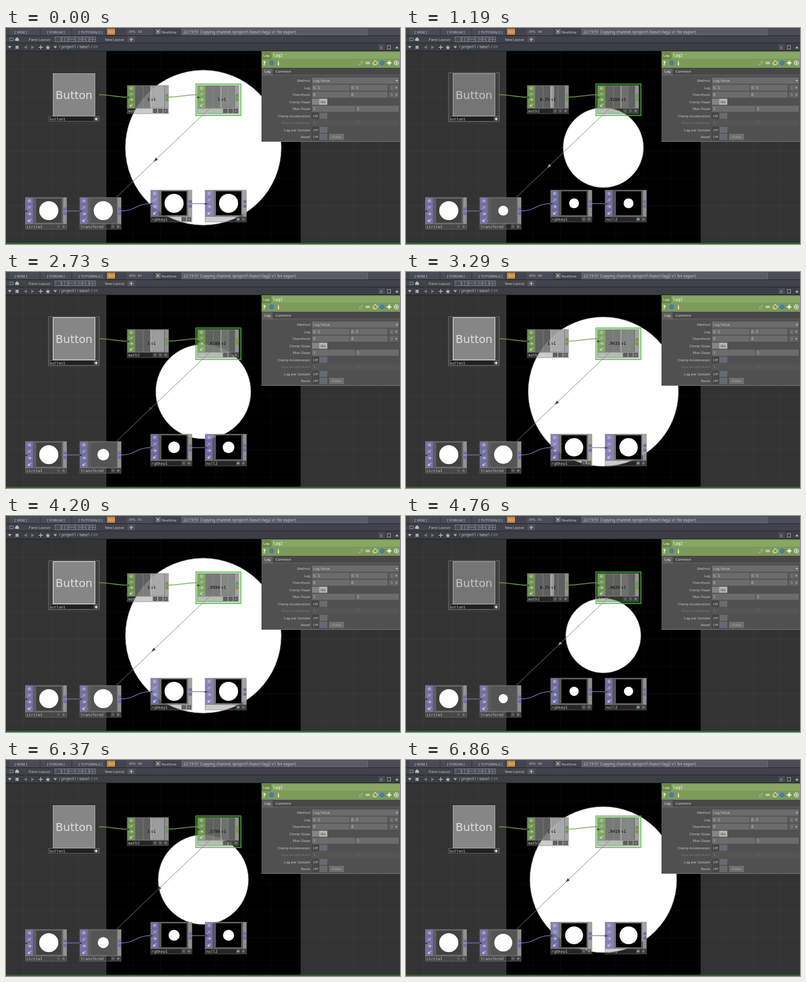
These frames come from a looping animation (640 px wide and 353 px high, 6930 ms). An HTML page:

```html
<!DOCTYPE html>
<html lang="en">
<head>
<meta charset="utf-8">
<title>Lag node network</title>
<style>
  html, body { margin: 0; width: 100%; height: 100%; overflow: hidden; background: #333; }
  svg { display: block; width: 640px; height: 353px; }
  text { font: 5.8px "Noto Sans", "DejaVu Sans", sans-serif; fill: #c8c8c8; white-space: pre; }
  .mono { font: 6.4px "DejaVu Sans Mono", monospace; }
  .ink { font-size: 6.6px; fill: #050505; }
  .help { font: bold 9px "DejaVu Sans", sans-serif; fill: #fff; }
  #buttonText { font: 17.9px "DejaVu Sans", sans-serif; }
  .wire { fill: none; stroke-width: 1.4; stroke-opacity: .85; }
</style>
</head>
<body>
<svg id="stage" viewBox="0 0 640 353" xmlns="http://www.w3.org/2000/svg"></svg>
<script>
const LOOP = 6930;
const FULL_RADIUS = 126.7, THUMB_RADIUS = 15.5;
const LOW = 0.25, HIGH = 1;
const LAG_RATE = Math.LN10 / 0.5;   // 90% of the way in half a second
const FPS = [53, 34, 41, 40, 41, 42, 39];
const PRESSES = [707, 2371, 4243, 6042];

const attrs = o => Object.entries(o).map(([k, v]) => ` ${k}="${v}"`).join('');
const rect = (x, y, w, h, fill, more = {}) =>
  `<rect${attrs({ x, y, width: w, height: h, fill, ...more })}/>`;
const disc = (cx, cy, r, fill, more = {}) => `<circle${attrs({ cx, cy, r, fill, ...more })}/>`;
const path = (d, stroke, more = {}) => `<path${attrs({ d, stroke, fill: 'none', ...more })}/>`;
const text = (x, y, s, more = {}) => `<text${attrs({ x, y, ...more })}>${s}</text>`;
const mono = (x, y, s, more = {}) => text(x, y, s, { class: 'mono', ...more });
const size = px => `font-size:${px}px`;

function grid() {
  let d = '';
  for (let x = 28.5; x < 640; x += 44.6) d += `M${x.toFixed(1)} 38V350`;
  for (let y = 67.5; y < 350; y += 44.6) d += `M0 ${y.toFixed(1)}H640`;
  return path(d, '#fff', { 'stroke-opacity': .035 });
}

function topBars() {
  const button = (x, w, s, tx) => rect(x, 1, w, 11, '#4a4d55') + text(tx, 8.6, s, { style: size(6) });
  let s = rect(0, 0, 640, 38, '#3b3e45')
    + rect(0, 0, 640, 12, '#41444c') + rect(0, 12, 640, 1, '#25272c')
    + rect(0, 13, 640, 11, '#40434a') + rect(0, 24, 640, 1, '#25272c')
    + rect(0, 37, 640, 1, '#202226')
    + button(6, 48, '[ WIKI ]', 14) + button(57, 48, '[ FORUM ]', 67)
    + button(108, 52, '[ TUTORIALS ]', 118)
    + rect(164, 1, 13, 10, '#c7843c') + text(166.5, 8.3, 'O|I', { style: 'fill:#fff' })
    + rect(195, 1, 44, 11, '#4a4d55')
    + text(200, 8.4, '', { id: 'fps' })
    + rect(243.5, 2.5, 7, 7, '#555', { stroke: '#999', 'stroke-width': .6 })
    + path('M245 4l4 4m0-4l-4 4', '#ddd', { 'stroke-width': 1 })
    + text(253, 8.5, 'Realtime')
    + rect(285.5, 1.5, 302, 10, '#5a5c64', { stroke: '#757780', 'stroke-width': .7 })
    + rect(588, 1, 52, 11, '#4a4d55')
    + text(288, 8.9, '22:19:51 Copying channel /project1/base1/lag2 v1 for export.', { style: size(6.45) })
    + path('M6 16.5h6v4h-6z', '#999', { 'stroke-width': .8 })
    + rect(15, 18, 6, 3, '#bbb') + path('M15 18l3-3 3 3z', 'none', { fill: '#bbb' })
    + text(37, 21, 'Pane Layout', { style: size(6) }) + text(160.5, 21, 'New Layout', { style: size(5.7) })
    + rect(197.5, 14, 12, 9.5, '#50535b') + path('M200.5 18.8h6m-3-3v6', '#ccc', { 'stroke-width': 1 });
  for (let i = 0; i < 6; i++) {
    const x = 79.5 + i * 11.2;
    s += rect(x, 14.5, 10, 8, '#4b4e56', { stroke: '#8b8d92', 'stroke-width': .7 });
    if (i) s += path(i === 2 ? `M${x} 18.5h10` : `M${x + 5} 14.5v8`, '#8b8d92', { 'stroke-width': .7 });
    if (i > 2) s += path(`M${x + (i === 3 ? 5 : 0)} 18.5h${i === 5 ? 10 : 5}`, '#8b8d92', { 'stroke-width': .7 });
  }
  return s + path('M3 29.5h6l-3 4z', 'none', { fill: '#bbb' }) + rect(15.5, 29, 5, 5, '#aaa')
    + path('M34 28.5l-5 3 5 3z', 'none', { fill: '#777' }) + path('M41 28.5l5 3-5 3z', 'none', { fill: '#777' })
    + path('M53 31.5h7m-3.5-3.5v7', '#ccc', { 'stroke-width': 1 })
    + path('M68 27.5l1 3h3l-2.4 2 1 3-2.6-1.8-2.6 1.8 1-3-2.4-2h3z', 'none', { fill: '#bbb' })
    + path('M77 29.5h6l-3 4z', 'none', { fill: '#aaa' })
    + text(86, 33.4, '/ project1 / base1 / &gt;&gt;', { style: size(6.2) })
    + rect(605, 26.5, 10, 9.5, '#4a4d55') + text(607.8, 33.5, '0')
    + rect(619.5, 28.5, 5, 6, 'none', { stroke: '#aaa', 'stroke-width': .8 })
    + path('M632 33.5h6l-3-4z', 'none', { fill: '#aaa' });
}

function panel() {
  const field = (x, y, w, s) => rect(x, y - 5, w, 10, '#6b6b6b')
    + mono(x + 2, y + 2.2, s, { style: size(6.2) });
  const toggle = (y, on) => rect(497, y - 5, 13, 10, on ? '#858585' : '#444')
    + rect(509, y - 5, 13, 10, on ? '#b5b5b5' : '#666a72')
    + text(on ? 511 : 498.5, y + 2, on ? 'On' : 'Off', { style: on ? 'fill:#222' : '' });
  const label = (y, s, dim) => text(494, y + 2, s, { 'text-anchor': 'end', style: dim ? 'fill:#777' : '' });
  const pair = (y, s) => field(497, y, 61, s) + field(559, y, 61, s);
  const scope = y => rect(622, y - 5, 16, 10, '#626262') + text(625, y + 2, 'S', { style: 'fill:#aaa' })
    + path(`M633 ${y - 2}l3 2-3 2z`, 'none', { fill: '#aaa' });
  return rect(415, 38, 225, 148, '#505050') + rect(415, 38, 225, 27, '#7c9a59')
    + rect(415, 39, 16, 12, '#6a8649') + rect(432, 40, 208, 10, '#8aa667')
    + text(418, 47.4, 'Lag', { style: 'fill:#fff' }) + mono(434, 47.4, 'lag2', { style: 'fill:#fff' })
    + text(417, 60.5, '?', { class: 'help' }) + disc(431.5, 57, 4, '#4a7ba8')
    + text(441, 60.5, 'i', { class: 'help' })
    + path('M573 60l5-6 2 1.5-5 5z', '#b4c59e', { 'stroke-width': .8 })
    + '<ellipse cx="587.5" cy="57" rx="4" ry="2.3" fill="#b4c59e"/>'
    + path('M596 57l4-4 4 4-3 3h-4z', '#fff')
    + disc(611, 57, 4, '#4a7ba8')
    + path('M619 57h7m-3.5-3.5v7', '#fff', { 'stroke-width': 2 })
    + disc(634, 57, 3.4, 'none', { stroke: '#fff' }) + disc(634, 57, 1.3, '#fff')
    + rect(415, 65, 225, 12, '#484848') + rect(416, 66, 17, 12, '#606060')
    + rect(433, 76.5, 207, .7, '#6c6c6c')
    + text(420, 73.3, 'Lag', { style: 'fill:#eee' }) + text(438, 73.3, 'Common', { style: 'fill:#ddd' })
    + label(86, 'Method') + rect(497, 81, 141, 10, '#6b6b6b') + text(499, 88.1, 'Lag Value', { style: size(6) })
    + path('M633 85h4l-2 3z', 'none', { fill: '#bbb' })
    + label(97.5, 'Lag') + pair(97.5, '0.5') + scope(97.5)
    + label(109, 'Overshoot') + pair(109, '0') + scope(109)
    + label(120.5, 'Clamp Slope') + toggle(120.5, true)
    + label(132, 'Max Slope') + field(497, 132, 70, '1') + field(568, 132, 70, '1')
    + label(143.5, 'Clamp Acceleration') + toggle(143.5)
    + label(155, 'Max Acceleration', true)
    + rect(497, 150, 141, 10, '#545454')
    + mono(499, 157, '1', { style: 'fill:#777' }) + mono(570, 157, '1', { style: 'fill:#777' })
    + label(166.5, 'Lag per Sample') + toggle(166.5)
    + label(178, 'Reset') + toggle(178)
    + rect(525, 173, 24, 10, '#707070') + text(530, 180, 'Pulse', { style: 'fill:#aaa' })
    + rect(415, 185, 225, 1, '#777');
}

function stripIcons(x, y, step) {
  const ink = '#d0d0d0';
  let s = '';
  for (let i = 0; i < 4; i++) {
    const cy = y + step * (i + .5), cx = x + 6.5;
    s += rect(x + 1, y + step * i + .5, 11, step - 1, '#fff', { opacity: .1 });
    s += i === 0 ? disc(cx, cy, 2.6, ink, { opacity: .6 })
      : i === 1 ? path(`M${cx - 3} ${cy + 2}l6-4m-4 0l2 4`, ink, { 'stroke-width': .9 })
      : i === 2 ? path(`M${cx - 3} ${cy}h4m-1-2l3 2-3 2z`, ink, { fill: ink, 'stroke-width': .8 })
      : disc(cx - .7, cy + .6, 2, ink) + disc(cx + 2, cy - 1.8, 1, ink);
  }
  return `<g opacity=".85">${s}</g>`;
}

function nodeFrame(x, y, h, name, tint, viewer, flags) {
  const base = y + h;
  let s = rect(x, base, 67, 9, '#6a6a6a', { 'fill-opacity': .35, stroke: '#777', 'stroke-width': .6 })
    + mono(x + 1.5, base + 7, name, { style: size(6.2) })
    + rect(x, y, 13, h, tint, { opacity: .9 })
    + rect(x + 13, y, 48, h, viewer, { 'fill-opacity': .88 })
    + rect(x + 61, y, 6, h, '#9c9c9c', { opacity: .92 })
    + rect(x + 62, y + h * .38, 5, 5, tint) + rect(x + 62, y + h * .55, 5, 5, tint)
    + rect(x - 1, y + h * .5, 4, 2, '#1c1c1c')
    + rect(x, y, 67, h, 'none', { stroke: '#888', 'stroke-opacity': .8, 'stroke-width': .8 })
    + stripIcons(x, y, h / 4);
  for (let i = 0; i <= flags; i++) {
    s += rect(x + 58.5 - 8.5 * i, base + 1, 7.5, 7, '#4a4a4d', { opacity: .85 });
    if (i) s += disc(x + 62.2 - 8.5 * i, base + 4.6, 2, name === 'null2' ? '#7d9be0' : '#626268');
  }
  return s + path(`M${x + 60} ${base + 4.6}h4.5m-2.25-2.25v4.5`, '#999', { 'stroke-width': .8 });
}

function channelNode(id, x, name) {
  const zero = x + 38;
  return nodeFrame(x, 94, 37, name, '#6f9a4c', '#6c6c6c', 2)
    + rect(zero, 94.5, 0, 36, '#d8d8d8', { id: id + 'Bar', opacity: id === 'lag' ? .12 : .5 })
    + path(`M${zero - 12} 94.5v36m24-36v36`, '#aaa', { 'stroke-width': .6, opacity: .6 })
    + rect(zero - .4, 94.5, .9, 36, '#ddd', { opacity: .85 })
    + mono(zero - 1.5, 119, '', { id: id + 'Value', class: 'mono ink', 'text-anchor': 'end' })
    + mono(zero + .5, 119, 'v1', { class: 'mono ink' });
}

function imageNode(x, y, name, fill, moving) {
  return nodeFrame(x, y, 43, name, '#716ca8', '#666', 1)
    + rect(x + 17.5, y + 2, 41, 39, fill)
    + disc(x + 38, y + 21.5, THUMB_RADIUS, '#fff', moving ? { class: 'thumb' } : {});
}

function buttonNode() {
  return rect(69, 73, 82.5, 80, '#3f3f3f', { id: 'buttonFrame', stroke: '#777', 'stroke-width': .8 })
    + rect(76.5, 74.5, 68, 69, '#757575', { id: 'buttonFace', stroke: '#aaa' })
    + text(110.5, 115.8, 'Button', { id: 'buttonText', 'text-anchor': 'middle' })
    + rect(69.5, 144.5, 82, 8, '#202020', { stroke: '#777', 'stroke-width': .7 })
    + mono(71, 150.8, 'button1', { style: size(6) })
    + rect(142, 145, 9, 7.5, '#444') + path('M144 148.7h5m-2.5-2.5v5', '#fff', { 'stroke-width': 1.2 });
}

const wire = (d, color) => path(d, color, { class: 'wire' });
const GREEN = '#75a653', VIOLET = '#7b76b4';

document.getElementById('stage').innerHTML =
  `<defs><pattern id="checker" width="2" height="2" patternUnits="userSpaceOnUse">
    <rect width="2" height="2" fill="#4b4b4b"/><path d="M0 0h1v1h-1zM1 1h1v1h-1z" fill="#5d5d5d"/></pattern></defs>`
  + rect(0, 0, 640, 353, '#333') + rect(163, 38, 315.5, 313, '#000')
  + disc(320.5, 195.5, 1, '#fff', { id: 'ball', stroke: '#777', 'stroke-width': .7 })
  + grid()
  + wire('M151 109C170 109 178 113 197 113', GREEN)
  + wire('M264 113C282 113 292 109 311 109', GREEN)
  + wire('M98 299H120', VIOLET)
  + wire('M186 299C212 299 210 287 235 287', VIOLET)
  + wire('M301 287H323', VIOLET)
  + buttonNode()
  + rect(308.5, 91.5, 73, 51.5, '#3c8c2c', { 'fill-opacity': .2, stroke: '#4cbc40', 'stroke-width': 1.8, 'stroke-opacity': .8 })
  + channelNode('math', 197, 'math2')
  + channelNode('lag', 311, 'lag2')
  + path('M330 132L180 276', '#808080', { 'stroke-width': .9 })
  + path('M-4 3.8L-.8-2.8 2.8.8z', 'none', { id: 'arrow' })
  + imageNode(31.5, 277, 'circle1', '#414141')
  + imageNode(120, 277, 'transform3', 'url(#checker)', true)
  + imageNode(235, 265, 'rgbkey1', '#000', true)
  + imageNode(323.5, 265, 'null2', '#000', true)
  + panel() + topBars()
  + rect(0, 351, 640, 1.5, '#237a2b');

const el = id => document.getElementById(id);
const set = (node, o) => { for (const k in o) node.setAttribute(k, o[k]); };
const thumbs = document.querySelectorAll('.thumb');

// Gap left after a step: slope limited to 1 per second, then exponential.
function remainingGap(seconds) {
  const knee = 1 / LAG_RATE, linear = HIGH - LOW - knee;
  return seconds < linear ? HIGH - LOW - seconds : knee * Math.exp(-LAG_RATE * (seconds - linear));
}

function laggedValue(t, pressCount, target) {
  if (!pressCount) return HIGH;
  const gap = remainingGap((t - PRESSES[pressCount - 1]) / 1000);
  return target === HIGH ? HIGH - gap : LOW + gap;
}

function showChannel(id, value, label) {
  el(id + 'Value').textContent = label;
  el(id + 'Bar').setAttribute('width', 22 * value);
}

function arrowX(t) {
  const start = 233, span = 36;
  const x = 251.5 - .0455 * t - 7.5 * Math.max(0, 1 - t / 1190);
  return start + (((x - start) % span) + span) % span;
}

function draw(t) {
  const pressCount = PRESSES.filter(p => p <= t).length;
  const on = pressCount % 2 === 0;
  const hovered = pressCount > 0 && pressCount < 4;
  const target = on ? HIGH : LOW;
  const value = laggedValue(t, pressCount, target);

  el('fps').textContent = 'FPS:  ' + FPS[Math.floor(t / 1000)];
  set(el('ball'), { r: FULL_RADIUS * value });
  thumbs.forEach(n => set(n, { r: THUMB_RADIUS * value }));
  showChannel('math', target, on ? '1' : '0.25');
  showChannel('lag', value, value > .99995 ? '1' : value.toFixed(4).slice(1));

  const x = arrowX(t);
  set(el('arrow'), { transform: `translate(${x} ${132 + (330 - x) * .96})`, fill: on ? '#444' : '#999' });
  set(el('buttonFrame'), { visibility: hovered ? 'visible' : 'hidden' });
  set(el('buttonFace'), { fill: on ? '#868686' : '#757575', stroke: on && hovered ? '#e0e0e0' : '#a5a5a5' });
  el('buttonText').style.fill = on ? '#dedede' : '#c4c4c4';
}

const began = performance.now();
function tick() {
  draw((performance.now() - began) % LOOP);
  requestAnimationFrame(tick);
}
draw(0);
requestAnimationFrame(tick);
</script>
</body>
</html>
```
